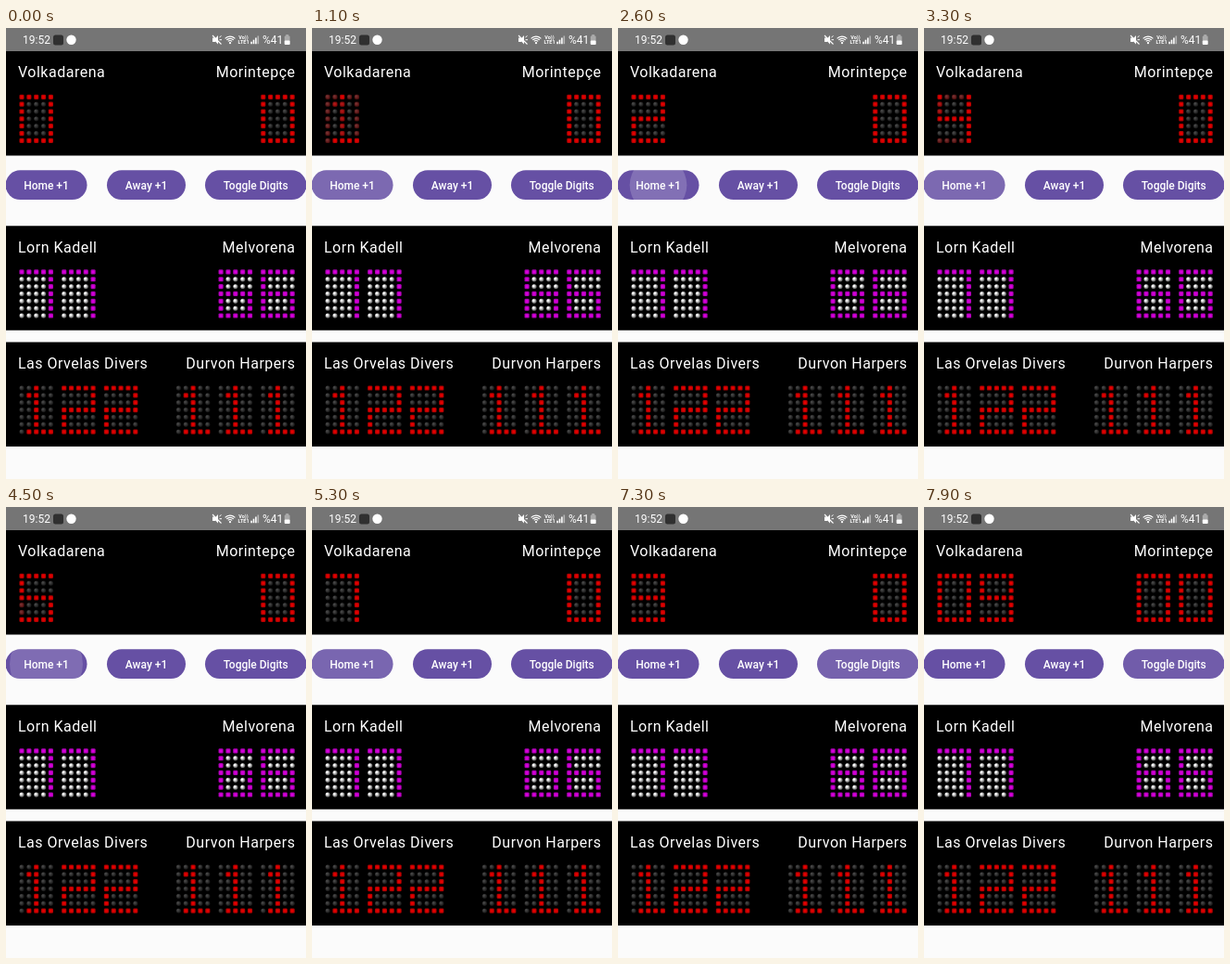
An HTML page with a canvas that plays this animation: 324 by 486 pixels, repeating every 8 s.

```html
<!DOCTYPE html>
<html lang="en">
<head>
<meta charset="utf-8">
<title>Dot matrix scoreboards</title>
<style>
html, body { margin: 0; width: 324px; height: 486px; overflow: hidden; background: #fbfbfb; }
canvas { display: block; width: 324px; height: 486px; }
</style>
</head>
<body>
<canvas id="stage"></canvas>
<script>
const W = 324, H = 486, LOOP = 8000;
const canvas = document.getElementById('stage');
const ctx = canvas.getContext('2d');
const scale = window.devicePixelRatio || 1;
canvas.width = W * scale;
canvas.height = H * scale;

const FONT = 'Roboto, Arial, sans-serif';
const PITCH = 7.85, DIGIT_STEP = 45.7;
const HOME_X = 17, AWAY_X = 277.8;
const FADE = 150, RIPPLE_GROW = 450, RIPPLE_FADE = 500;
// Press and release times; a click counts on release.
const HOME_PRESSES = [
  [700, 1000], [1650, 2050], [2500, 2700], [2950, 3200], [3800, 4000],
  [4320, 4450], [5020, 5150], [5420, 5550], [5820, 5950]
];
const TOGGLE_PRESS = [7000, 7760], TOGGLE_CLICK = 7560;
const SEGMENTS = ['abcdef', '', 'abdeg', 'abcdg', 'bcfg', 'acdfg', 'acdefg', 'abc', 'abcdefg', 'abcdfg'];

const clamp = v => Math.max(0, Math.min(1, v));

function isLit(digit, col, row) {
  if (digit === 1) return col === 2 || (col === 1 && row === 1) || (row === 6 && col > 0);
  const on = s => SEGMENTS[digit].includes(s);
  return (row === 0 && on('a')) || (row === 3 && on('g')) || (row === 6 && on('d')) ||
    (col === 4 && ((row <= 3 && on('b')) || (row >= 3 && on('c')))) ||
    (col === 0 && ((row <= 3 && on('f')) || (row >= 3 && on('e'))));
}

function rect(x, y, w, h, color, radius = 0) {
  ctx.fillStyle = color;
  ctx.beginPath();
  ctx.roundRect(x, y, w, h, radius);
  ctx.fill();
}

function circle(x, y, r, color) {
  ctx.fillStyle = color;
  ctx.beginPath();
  ctx.arc(x, y, r, 0, 7);
  ctx.fill();
}

function text(str, x, y, size, { align = 'left', weight = 400, spacing = 0 } = {}) {
  ctx.font = `${weight} ${size}px ${FONT}`;
  ctx.letterSpacing = spacing + 'px';
  ctx.textAlign = align;
  ctx.fillStyle = '#fff';
  ctx.fillText(str, x, y);
}

function line(color, width, ...points) {
  ctx.strokeStyle = color;
  ctx.lineWidth = width;
  ctx.beginPath();
  points.forEach(p => ctx.lineTo(...p));
  ctx.stroke();
}

// Each pair runs from the middle of the dot to its edge.
const RED = { on: ['#e60000', '#7c0000'], off: ['#444444', '#0c0c0c'] };
const MAGENTA = { on: ['#d800dc', '#80008a'], off: ['#fafafa', '#3c3c3c'] };

function shade(x, y, shift, radius, [middle, edge]) {
  const g = ctx.createRadialGradient(x - shift, y - shift, 0.8, x, y, radius);
  g.addColorStop(0, middle);
  g.addColorStop(1, edge);
  return g;
}

function dot(x, y, level, theme) {
  if (level < 1) circle(x, y, 2.7, shade(x, y, 0.8, 3, theme.off));
  ctx.globalAlpha = level;
  rect(x - 2.6, y - 2.6, 5.2, 5.2, shade(x, y, 0, 3.8, theme.on), 1.2);
  ctx.globalAlpha = 1;
}

// Cross-fades from one digit to the next; k is the progress.
function digit(x, y, to, theme, from = to, k = 1) {
  for (let row = 0; row < 7; row++)
    for (let col = 0; col < 5; col++) {
      const level = isLit(from, col, row) * (1 - k) + isLit(to, col, row) * k;
      dot(x + col * PITCH, y + row * PITCH, level, theme);
    }
}

function number(digits, x, y, theme) {
  [...digits].forEach((d, i) => digit(x + i * DIGIT_STEP, y, +d, theme));
}

function panel(y, home, away) {
  rect(0, y, W, 112.5, '#000');
  text(home, 13, y + 28.2, 16, { spacing: 0.5 });
  text(away, 312.5, y + 28.2, 16, { align: 'right', spacing: 0.5 });
}

function button(label, x, w, t, presses, strength) {
  rect(x, 153.3, w, 31.8, '#6650a4', 15.9);
  ctx.save();
  ctx.clip();
  for (const [down, up] of presses) {
    if (t < down || t > up + RIPPLE_FADE) continue;
    const grow = clamp((t - down) / RIPPLE_GROW);
    const alpha = strength * clamp((t - down) / 75) * (1 - clamp((t - up) / RIPPLE_FADE));
    circle(x + w / 2, 169.2, 20 + w * 0.55 * grow, `rgba(255,255,255,${alpha})`);
  }
  ctx.restore();
  text(label, x + w / 2, 173.5, 12, { align: 'center', weight: 500 });
}

function wifi(x, y) {
  ctx.strokeStyle = '#fff';
  ctx.lineWidth = 1.2;
  for (const r of [3, 5.2, 7.4]) {
    ctx.beginPath();
    ctx.arc(x, y, r, -Math.PI * 0.76, -Math.PI * 0.24);
    ctx.stroke();
  }
  circle(x, y - 0.3, 1.1, '#fff');
}

function statusBar() {
  rect(0, 0, W, 25, '#757575');
  text('19:52', 18, 17, 12);
  rect(51, 7.5, 11, 11, '#303030', 2.5);
  circle(70.5, 12.8, 5.2, '#fff');

  rect(223, 10.5, 3, 4.5, '#fff');
  ctx.beginPath();
  ctx.moveTo(224.5, 12.7);
  ctx.lineTo(229, 8);
  ctx.lineTo(229, 17.5);
  ctx.fill();
  line('#fff', 1.1, [223, 8], [232.5, 17.5]);
  line('#fff', 1, [230.5, 10], [232.5, 8.5]);
  line('#fff', 1, [230.5, 12.7], [233, 12.7]);

  wifi(242, 16.5);
  text('Vo))', 256.5, 12, 5.5, { align: 'center', weight: 700 });
  text('LTE1', 256.5, 17.3, 5.5, { align: 'center', weight: 700 });
  for (let i = 0; i < 4; i++)
    rect(264.3 + i * 2.4, 14.8 - i * 2.1, 1.6, 2.4 + i * 2.1, i < 3 ? '#fff' : '#b5b5b5');
  text('%41', 277, 17, 12);
  rect(302.2, 7.3, 3, 1.5, '#bbb');
  rect(300.8, 8.5, 5.8, 9.5, '#aaa', 1);
  rect(300.8, 13.6, 5.8, 4.4, '#fff', 1);
}

function liveScore(t, y) {
  const clicks = HOME_PRESSES.map(press => press[1]).filter(c => t >= c);
  const score = clicks.length;
  if (t < TOGGLE_CLICK) {
    const k = score ? clamp((t - clicks[score - 1]) / FADE) : 1;
    digit(HOME_X, y, score, RED, Math.max(0, score - 1), k);
  } else {
    digit(HOME_X, y, 0, RED, score, clamp((t - TOGGLE_CLICK) / FADE));
    digit(HOME_X + DIGIT_STEP, y, score, RED);
    digit(AWAY_X - DIGIT_STEP, y, 0, RED);
  }
  digit(AWAY_X, y, 0, RED);
}

function draw(t) {
  ctx.setTransform(scale, 0, 0, scale, 0, 0);
  rect(0, 0, W, H, '#fbfbfb');
  statusBar();

  panel(25, 'Volkadarena', 'Morintepçe');
  liveScore(t, 74.3);

  button('Home +1', -0.5, 88, t, HOME_PRESSES, 0.18);
  button('Away +1', 109, 85, t, [], 0);
  button('Toggle Digits', 215, 109.5, t, [TOGGLE_PRESS], 0.1);

  panel(213.3, 'Lorn Kadell', 'Melvorena');
  number('77', HOME_X, 262.9, MAGENTA);
  number('66', AWAY_X - DIGIT_STEP, 262.9, MAGENTA);

  panel(338.5, 'Las Orvelas Divers', 'Durvon Harpers');
  number('122', HOME_X, 388, RED);
  number('111', AWAY_X - 2 * DIGIT_STEP, 388, RED);
}

const start = performance.now();
function tick() {
  draw((performance.now() - start) % LOOP);
  requestAnimationFrame(tick);
}
tick();
</script>
</body>
</html>
```
